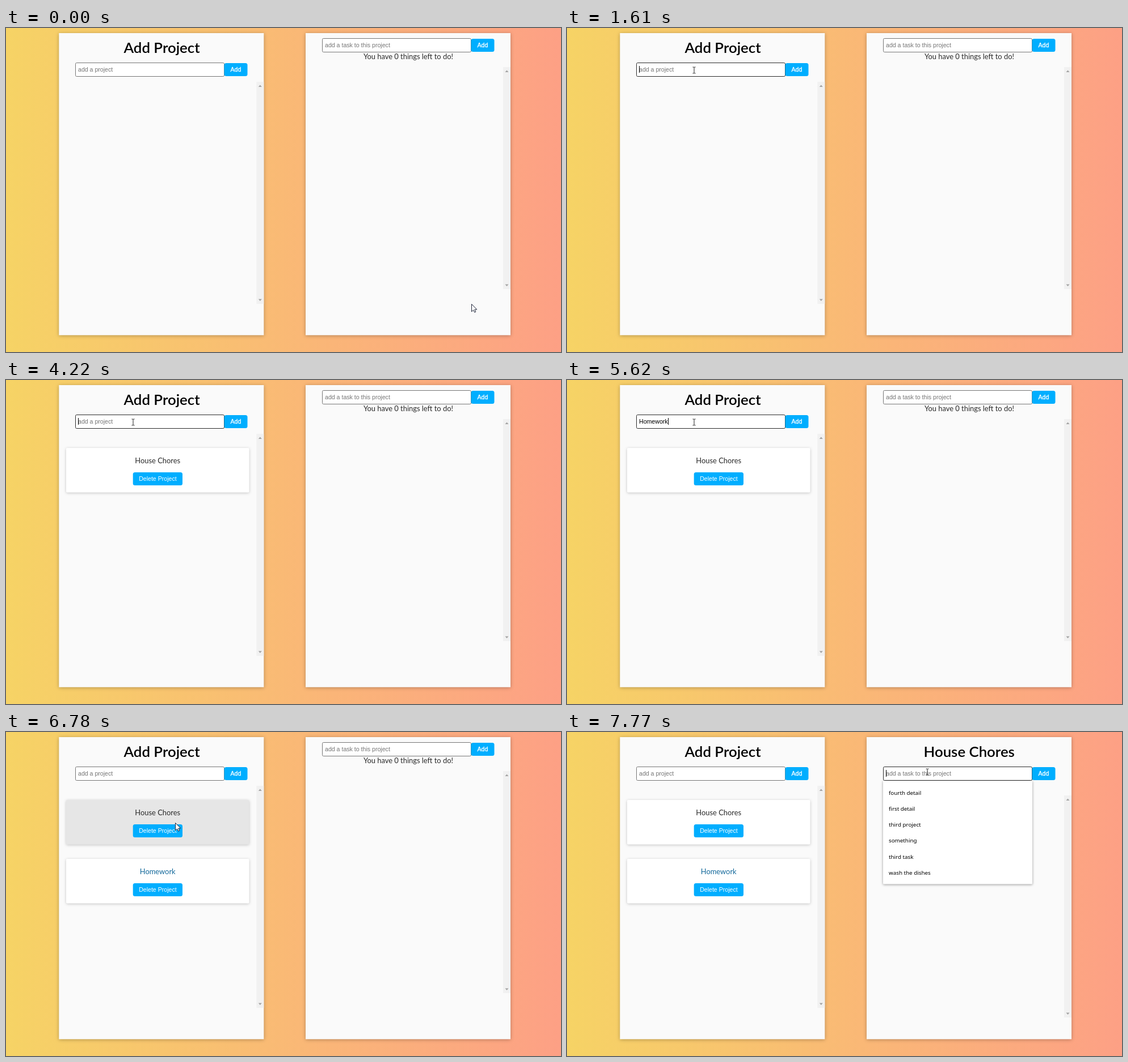
Animation, 978 px wide and 572 px high, one loop 8000 ms. Source, as an HTML page:

```html
<!DOCTYPE html>
<html lang="en">
<head>
<meta charset="utf-8">
<title>Project list</title>
<style>
  html, body { margin: 0; width: 100%; height: 100%; overflow: hidden; }
  body { background: linear-gradient(90deg, #f6d365, #fda085); }
  svg { display: block; width: 978px; height: 572px; }
  text { white-space: pre; }
  .title { font: 600 25.8px Lato, sans-serif; text-anchor: middle; }
  .label { font: 12.9px Lato, sans-serif; text-anchor: middle; fill: #2a2a2a; }
  .ui { font: 10.6px "Liberation Sans", Arial, sans-serif; }
  .hint { fill: #757575; }
  .btn { fill: #fff; text-anchor: middle; }
  .add { stroke: #fff; stroke-width: .3px; }
  .option { font: 9.8px "Noto Sans", sans-serif; }
  .panel { filter: drop-shadow(0 1px 3px rgba(0, 0, 0, .28)); }
  .card { filter: drop-shadow(0 1px 2.5px rgba(0, 0, 0, .22)); }
  .menu { filter: drop-shadow(0 1px 2px rgba(0, 0, 0, .4)); }
</style>
</head>
<body>
<svg id="stage" viewBox="0 0 978 572"></svg>
<script>
const LOOP = 8000, BLINK = 530, STEP = 67;
const stage = document.getElementById('stage');

function add(parent, tag, attrs, content) {
  const node = document.createElementNS('http://www.w3.org/2000/svg', tag);
  for (const k in attrs) node.setAttribute(k, attrs[k]);
  if (content) node.textContent = content;
  parent.appendChild(node);
  return node;
}
const group = parent => add(parent, 'g', {});
const rect = (g, x, y, width, height, fill, more) =>
  add(g, 'rect', { x, y, width, height, fill, ...more });
const text = (g, x, y, cls, str) => add(g, 'text', { x, y, class: cls }, str);
const show = (node, on) => node.setAttribute('visibility', on ? 'visible' : 'hidden');

function field(g, x, hint) {
  const box = rect(g, x + .5, 61.5, 262, 24, '#fff', { rx: 2, stroke: '#767676' });
  const placeholder = text(g, x + 5, 77, 'ui hint', hint);
  const value = text(g, x + 5, 77, 'ui', '');
  const caret = rect(g, x + 5, 67, 1, 12, '#000');
  rect(g, x + 262.5, 62, 41, 23, '#00aeff', { rx: 3.5 });
  text(g, x + 282.9, 77, 'ui btn add', 'Add');
  return { box, placeholder, value, caret, x: x + 5 };
}

function scrollbar(g, x, y) {
  rect(g, x, y, 13, 392, '#f1f1f1');
  add(g, 'path', {
    d: `M${x + 3.5} ${y + 9}l3-3.5 3 3.5zM${x + 3.5} ${y + 383.5}l3 3.5 3-3.5z`,
    fill: '#a3a3a3'
  });
}

function card(g, y, name, color) {
  const node = group(g);
  const face = rect(node, 106, y, 322.5, 78.5, '#fff', { rx: 2, class: 'card' });
  text(node, 267.2, y + 27, 'label', name).style.fill = color;
  rect(node, 223.7, y + 43, 87.3, 23, '#00aeff', { rx: 3.5 });
  text(node, 267.4, y + 58.3, 'ui btn', 'Delete Project');
  return { node, face };
}

// Scene
for (const x of [93.3, 528]) rect(stage, x, 9, 361, 533.3, '#fafafa', { class: 'panel' });

const left = group(stage);
text(left, 274.5, 44, 'title', 'Add Project');
const projects = field(left, 122, 'add a project');
scrollbar(left, 441.3, 95);
const chores = card(left, 120, 'House Chores', '#2a2a2a');
const homework = card(left, 224, 'Homework', '#14699b');

const heading = text(stage, 708.7, 44, 'title', 'House Chores');
const right = group(stage);
const tasks = field(right, 557, 'add a task to this project');
text(right, 708.9, 98, 'label', 'You have 0 things left to do!');
scrollbar(right, 876, 112);

const menu = group(stage);
rect(menu, 557, 86, 263, 182.5, '#fff', { rx: 1.5, class: 'menu' });
['fourth detail', 'first detail', 'third project', 'something', 'third task', 'wash the dishes']
  .forEach((s, i) => text(menu, 567, 110.5 + i * 28.3, 'option', s));

const pointer = group(stage);
const arrow = add(pointer, 'path', {
  d: 'M.5.5V13.8L3.6 10.9 5.7 15 7.8 14.1 5.8 10H9.8Z',
  fill: '#fff', stroke: '#20263a', 'stroke-linejoin': 'round'
});
const beam = add(pointer, 'path', {
  d: 'M-2.5-5H-.5L0-4.5 .5-5H2.5M0-4.5V5.5M-2.5 6H-.5L0 5.5 .5 6H2.5',
  fill: 'none', stroke: '#222'
});

// Typing happens in bursts of evenly spaced keys; a null clears the field.
const keys = [];
function burst(start, gap, chars) {
  [...chars].forEach((c, i) => keys.push({ t: start + i * gap, c }));
}
const clear = t => keys.push({ t, c: null });

clear(550);
burst(1680, 0, 'H');
burst(1880, 100, 'ouse ');
burst(2550, 130, 'Ch');
burst(2880, 70, 'ores');
clear(3160);
burst(4820, 130, 'Ho');
burst(5150, 94, 'mework');
clear(5820);

function typed(t) {
  let value = '', last = 0;
  for (const k of keys) {
    if (k.t > t) break;
    value = k.c === null ? '' : value + k.c;
    last = k.t;
  }
  return { value, last };
}

const ramp = (t, a, b) => Math.min(1, Math.max(0, (t - a) / (b - a)));
const ease = p => p * p * (3 - 2 * p);

// The pointer rests between straight, eased moves.
const home = { x: 820, y: 487 };
const moves = [
  { from: 10, to: 540, x: 224, y: 74 },
  { from: 6030, to: 6440, x: 298, y: 160 },
  { from: 6834, to: 7035, x: 616, y: 51 },
  { from: 7035, to: 7370, x: 635, y: 70 }
];
function pointerAt(t) {
  let { x, y } = home;
  for (const m of moves) {
    const p = ease(ramp(t, m.from, m.to));
    x += (m.x - x) * p;
    y += (m.y - y) * p;
  }
  return [Math.round(x), Math.round(y)];
}

const blinkOn = since => since % (2 * BLINK) < BLINK;

function setField(f, value, focused, caretOn) {
  f.box.setAttribute('stroke', focused ? '#2b2b2b' : '#767676');
  if (f.value.textContent !== value) f.value.textContent = value;
  show(f.placeholder, !value);
  show(f.caret, focused && caretOn);
  f.caret.setAttribute('x', Math.round(f.x + (value ? f.value.getComputedTextLength() : 0)));
}

function draw(t) {
  const opened = t >= 6850;

  const { value, last } = typed(t);
  setField(projects, value, t >= 550 && t < 6370, blinkOn(t - last));
  setField(tasks, '', opened, t >= 7580 && blinkOn(t - 7580));

  show(chores.node, t >= 3420);
  show(homework.node, t >= 6020);
  const hover = ramp(t, 6240, 6740) - ramp(t, 6920, 7390);
  chores.face.setAttribute('fill', `hsl(0 0% ${100 - 10 * hover}%)`);

  show(heading, opened);
  right.setAttribute('transform', `translate(0 ${opened ? 0 : -43})`);
  menu.setAttribute('opacity', ramp(t, 7580, 7770));

  const [x, y] = pointerAt(Math.floor((t + 5) / STEP) * STEP);
  const inField = y > 61 && y < 86 && (x > 122 && x < 385 || opened && x > 557 && x < 820);
  pointer.setAttribute('transform', `translate(${x} ${y})`);
  show(arrow, !inField);
  show(beam, inField);
}

function frame() {
  draw(performance.now() % LOOP);
  requestAnimationFrame(frame);
}
frame();
</script>
</body>
</html>
```
